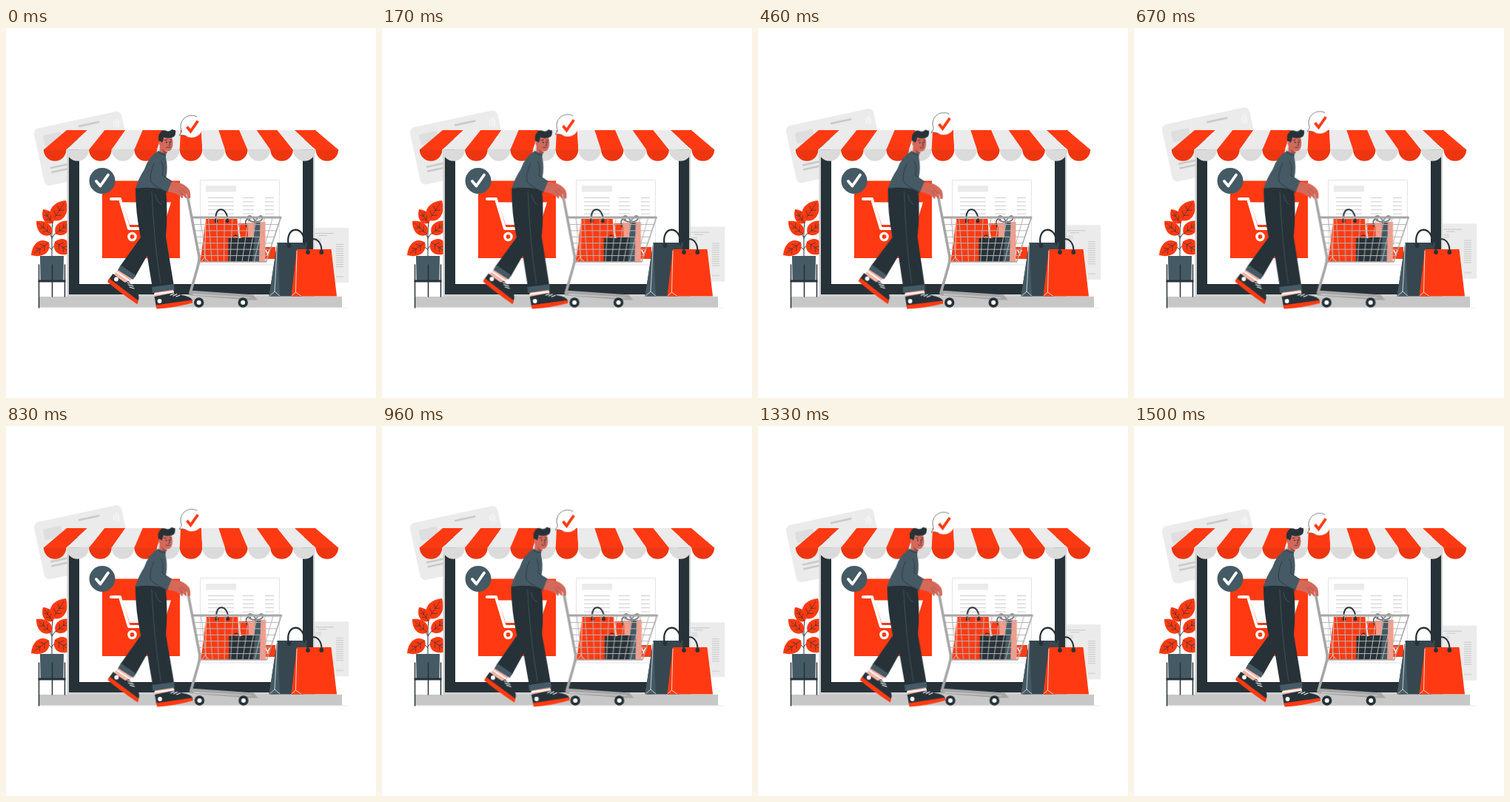
An HTML page for the animation above (1.54 s loop, 500 by 500 pixels).

```html
<!DOCTYPE html>
<html lang="en">
<head>
<meta charset="utf-8">
<title>Online shopping</title>
<style>
html, body { margin: 0; width: 100%; height: 100%; overflow: hidden; background: #fff; }
svg { display: block; width: 100vw; height: 100vh; }
.red { fill: #ff3a12; }
.dark { fill: #263238; }
.slate { fill: #455a64; }
.skin { fill: #d3695b; }
.light { fill: #ebebeb; }
.line { fill: none; stroke: #263238; stroke-linecap: round; stroke-linejoin: round; }
.white { fill: none; stroke: #fff; stroke-linecap: round; stroke-linejoin: round; }
.grey { fill: none; stroke: #a6a6a6; stroke-linecap: round; stroke-linejoin: round; }
.rule { fill: none; stroke: #c7c7c7; }
#man { transform-origin: 195px 258px; }
</style>
</head>
<body>
<svg viewBox="0 0 500 500">
  <g id="card">
    <g transform="translate(36.5 137) rotate(-12.2)">
      <rect class="light" width="121" height="79" rx="7"/>
      <rect x="11" y="11" width="25" height="15" rx="2" fill="#dedede"/>
      <path class="rule" stroke-width="2.5" d="M61 9H90M12 56H36M12 62H36"/>
      <path class="white" stroke-width="1" d="M108 13q2 3 0 6M110.5 11.5q3.5 4.5 0 9M113 10q4.5 6 0 12"/>
    </g>
  </g>

  <g id="doc">
    <rect class="light" x="405" y="270" width="58" height="74"/>
    <path id="docLines" class="rule" stroke-width="1.1" d="M418 277.5H443M422 280.5H434M418 285H426M418 288H426M446 336H456"/>
  </g>

  <path d="M45 378H462" stroke="#ddd" stroke-width=".6"/>
  <rect x="45" y="363" width="409" height="14.5" fill="#c7c7c7"/>

  <g id="plant">
    <path class="line" stroke-width="1" d="M62 308V278Q62 262 65 256M62 284Q64 279 70 275M62 298Q66 292 70 291M62 300Q58 294 52 295M62 283Q58 276 53 273"/>
    <g id="leaves"></g>
    <path class="slate" d="M46 308H78L77.5 341H46.500Z"/>
    <path class="line" stroke-width="1.500" stroke-linecap="butt" d="M44.500 320V378M79.500 320V363M62.500 320V363"/>
    <path class="dark" d="M43.500 340.500H80.500V343.500H43.500Z"/>
  </g>

  <g id="screen">
    <path d="M82.5 150H417V363H82.5Z" fill="#d0d0d0"/>
    <path class="dark" d="M85 150H415V360H85Z"/>
    <path d="M99 150H401V346H99Z" fill="#fff"/>
    <rect class="red" x="130" y="206.5" width="105" height="104.5"/>
    <path class="white" stroke-width="4" d="M142 231H154L166 271H214"/>
    <path d="M157 235.500H223L213.500 266H167Z" fill="#fff"/>
    <circle class="white" cx="170.5" cy="282" r="4.6" stroke-width="3.4"/>
    <path d="M262.5 320V205.5H369.5V320Z" fill="#fff" stroke="#dcdcdc" stroke-width=".8"/>
    <rect class="light" x="270" y="213" width="41" height="8.5"/>
    <path id="rows" class="rule" stroke-width=".9"/>
    <rect class="red" x="322" y="296" width="42" height="16"/>
    <text x="357" y="308" text-anchor="end" font-family="Lato, sans-serif" font-weight="900" font-size="10.5" fill="#fff">BUY</text>
  </g>

  <g id="awning"></g>

  <circle class="slate" cx="130" cy="206.5" r="17.5"/>
  <path class="white" stroke-width="3.9" stroke-linecap="butt" stroke-linejoin="miter" d="M122 207L127.500 213.500L138 198.500"/>

  <g id="bubble">
    <path d="M234 145Q237.500 141.500 237.200 139A15 15 0 1 1 243.500 146Q239 144 234 145Z" fill="#fff"/>
    <path class="line" stroke-width=".6" d="M243.500 146Q239 144 234 145Q237.500 141.500 237.200 139A15 15 0 0 1 258 119.800"/>
    <path d="M244.500 133.500L249.500 139.500L259.300 125.500" fill="none" stroke="#ff3a12" stroke-width="3.800"/>
  </g>

  <g id="bags">
    <path d="M366.500 290H407L401 362.500H355.500Z" fill="#37474f"/>
    <path class="slate" d="M366.500 290L355.500 362.500H370Z"/>
    <path class="white" stroke-width=".7" d="M366.500 292L363 356L356.500 362M363 356L370 362"/>
    <path class="line" stroke-width="2.300" d="M382 294C376 266 405 266 403 292"/>
    <circle class="dark" cx="382.500" cy="294" r="3"/>
    <path class="red" d="M393 299H439.500L447 362.500H385.500Z"/>
    <path class="white" stroke-width=".8" stroke-dasharray="3 .7" d="M393 301L391.500 357L386 362M391.500 357L398.500 362"/>
    <path class="line" stroke-width="2.100" d="M408 303C404 279 427 280 426.500 302"/>
    <circle class="dark" cx="408" cy="303" r="2.900"/>
    <circle class="dark" cx="426.300" cy="303" r="2.900"/>
  </g>

  <g id="cart">
    <path class="red" d="M270 258H312.500L316 316H262.500Z"/>
    <path class="white" stroke-width=".7" d="M270 260L268.500 310L263.500 316M268.500 310L274 316"/>
    <path class="line" stroke-width="2" d="M284 261C280 240 300 240 299.500 261"/>
    <circle class="dark" cx="284" cy="261" r="2.400"/>
    <circle class="dark" cx="299" cy="261" r="2.400"/>
    <path class="red" d="M314 264H338V285H317Z"/>
    <path d="M327 263H336V285H327ZM341 262H350.500V316H341Z" fill="#ff9a86"/>
    <path class="slate" d="M336 263H343.500L342 316H333Z"/>
    <path class="dark" d="M300.500 284H321V316H300.500ZM319 283H336L333 316H317Z"/>
    <path class="line" stroke-width="1.300" d="M305 286Q310 275 315 285M325 269Q321 256 330 259"/>
    <path class="line" stroke-width="1.800" style="stroke:#6f7a80" d="M337 262Q327 262 326 256Q330 250 337 261Q344 250 347 256Q346 262 337 262"/>
    <g id="wires" class="grey" style="stroke:#b4b4b4" stroke-width="1"></g>
    <path class="grey" stroke-width="1.500" d="M371 257L351.500 316H262"/>
    <path class="grey" stroke-width="3.200" d="M251.500 256H371"/>
    <path class="grey" stroke-width="3.600" d="M245.500 228L261 309Q261.500 315 259 323L249 358"/>
    <path d="M248 354.500L334 360.500L340 367.500H326L248 361.500Z" fill="#a6a6a6"/>
    <path d="M253 359L330 364V365L253 361Z" fill="#c7c7c7"/>
    <g id="wheels"></g>
  </g>

  <g id="man">
    <!-- rear leg -->
    <path d="M153 325L171 338L162 347L145 334Z" fill="#f3b3a5"/>
    <path class="white" stroke-width="2" d="M150 330L166 341"/>
    <path class="dark" d="M144.500 332Q153 339 161 344L165 342Q172 347 176 356Q180 360 179.500 366L177 371L138 341Z"/>
    <path class="red" d="M139.500 338.500L179 368.500L177.500 373.500Q153 357 137 343Z"/>
    <path class="white" stroke-width="1.100" d="M164 344L170.500 346M165 347L172 349M167 350L173 352"/>
    <circle cx="149" cy="339.500" r="2.900" fill="#fff"/>
    <path class="dark" d="M175 217L205 222Q206 270 195 300L174.500 336L154 322L182 283Q175 250 175 217Z"/>
    <path class="slate" d="M155 320.500L175.500 334.500L171.500 340L151 327Z"/>
    <!-- front leg -->
    <path d="M200 355L226 352L227 360L202 363Z" fill="#f3b3a5"/>
    <path class="white" stroke-width="2" d="M201 359.500L226 356.500"/>
    <path class="dark" d="M200.500 363L223 358.500Q231 357 238 361Q250 363 252 368L251 371L203 377Z"/>
    <path class="red" d="M202.500 374.500L252 367.500V371.500Q228 378 203.500 379.500Z"/>
    <path class="white" stroke-width="1.100" d="M222 361L227 359M226 362L231 359.500M230 363L235 361"/>
    <circle cx="207.500" cy="369" r="2.900" fill="#fff"/>
    <path class="dark" d="M175 216Q196 211 216 217Q219 250 216 282L227 349L198 352L187 285Q176 248 175 216Z"/>
    <path class="line" style="stroke:#455a64" stroke-width=".8" d="M197 221Q200 290 209 345M202 225Q204 236 210 238"/>
    <path class="slate" d="M197 350L227 346L227.500 353.500L198 358Z"/>
    <!-- head -->
    <path class="skin" d="M208 157L207.500 168Q212 173 216 169L217 160Z"/>
    <path d="M211 162Q213 168 218 167L217 170Q211 169 211 162Z" fill="#9e4539"/>
    <path class="skin" d="M209 148Q217 144 224 147Q227 157 224 163Q221 168 216 166Q211 165 209.500 160Q205.500 158 207 153Z"/>
    <path class="dark" d="M206.500 153Q205 145 208 142Q211 136 218 139.500Q221 140 223 138Q225 136 226.500 138Q230 137 229 142Q229 147 224 148Q217 149.500 213 147.500Q213 152 210.500 155Q209 152 206.500 153Z"/>
    <circle class="dark" cx="217" cy="154.500" r=".9"/>
    <circle class="dark" cx="222.500" cy="154" r=".9"/>
    <path class="line" stroke-width=".8" d="M214.500 151.800L217.500 151M221.500 151L224 151.500M220.500 154L222 158L220 158.500M217 161.200Q219.500 162.500 222 160.700"/>
    <!-- body -->
    <path class="slate" d="M206 166Q211 169 216 169.500V175Q219 188 216.500 201L212 218Q193 214 175 217Q179 203 187 191Q193 173 206 166Z"/>
    <path class="skin" d="M219 208L231 208.500Q243 211 248 219Q250 226 249 230L246 230Q245 225 243 223Q245 228 243.500 230.500L239 226Q240 230 237.500 230Q233 223 217 221Z"/>
    <path class="line" stroke-width=".6" style="stroke:#9e4539" d="M237 217L243 223M234 219L239 226"/>
    <path class="slate" d="M203 178Q212 172 215 183L212 199L224 207L218 222L197 212Q193 208 196 199Z"/>
    <path class="line" stroke-width=".7" d="M210 180Q214 187 211.500 199L224 207M200 183Q193 199 196 208Q198 212 218 222M206 168Q211 172 216 171.500"/>
  </g>
</svg>
<script>
const PERIOD = 1540;
const $ = id => document.getElementById(id);
const add = (id, html) => $(id).insertAdjacentHTML('beforeend', html);
const range = n => [...Array(n).keys()];

// Awning: 13 slanted stripes with scallops, the red ones wider at the top
const redW = 28, greyW = (336 - 7 * redW) / 6, lowW = 398.4 / 13;
range(13).forEach(i => {
  const red = i % 2 === 0, w = red ? redW : greyW;
  const a = 82 + Math.ceil(i / 2) * redW + Math.floor(i / 2) * greyW, b = 50.8 + i * lowW;
  add('awning',
    `<path d="M${a} 138h${w}L${b + lowW} 164.5H${b}Z" fill="${red ? '#ff3a12' : '#ebebeb'}"/>` +
    `<path d="M${b} 164.3h${lowW}a${lowW / 2} 15.5 0 0 1 ${-lowW} 0" fill="${red ? '#ee3510' : '#dbdbdb'}"/>` +
    `<path d="M${b} 164.3h${lowW}" stroke="${red ? '#d92c08' : '#c7c7c7'}" stroke-width=".5"/>`);
});

// Plant leaves: base, tip, half width
[[63, 260, 81, 233, 10], [63, 264, 50, 245, 7], [61, 279, 41, 261, 8],
 [67, 278, 88, 261, 8], [58, 290, 34, 307, 9], [66, 289, 88, 304, 10]].forEach(([x, y, u, v, w]) => {
  const len = Math.hypot(u - x, v - y), turn = Math.atan2(v - y, u - x) * 180 / Math.PI;
  const at = f => len * f;
  add('leaves', `<g transform="translate(${x} ${y}) rotate(${turn})">
    <path class="red" d="M0 0C${at(.15)} ${-w * 1.4} ${at(.65)} ${-w * 1.4} ${len} 0C${at(.65)} ${w * 1.4} ${at(.15)} ${w * 1.4} 0 0"/>
    <path class="line" stroke-width=".6" d="M0 0H${at(.85)}M${at(.25)} 0l4 ${-w * .6}M${at(.25)} 0l4 ${w * .6}M${at(.5)} 0l4 ${-w * .5}M${at(.5)} 0l4 ${w * .5}"/></g>`);
});

// Ruled lines
$('rows').setAttribute('d', range(5).map(i => {
  const y = 229.5 + i * 5.4;
  return `M273 ${y}H308M320 ${y}H335M350 ${y}H362`;
}).join(''));
$('docLines').setAttribute('d', $('docLines').getAttribute('d') +
  range(11).map(i => `M446 ${292.5 + i * 3}H456`).join(''));

// Basket wires and wheels
range(6).forEach(i => {
  const f = (i + 1) / 7, y = 257 + f * 59;
  add('wires', `<path d="M${252 + f * 10} ${y}H${371 - f * 19.5}"/>`);
});
range(10).forEach(i => {
  const f = (i + 1) / 11;
  add('wires', `<path d="M${252 + f * 119} 257L${262 + f * 89.5} 316"/>`);
});
[260.7, 320.2].forEach(x => add('wheels',
  `<circle class="dark" cx="${x}" cy="371" r="6.7"/><circle cx="${x}" cy="371" r="3" fill="#fff"/>`));

// Motion
const play = (id, frames, easing) =>
  $(id).animate(frames.map(([offset, transform]) => ({ offset, transform, easing })),
    { duration: PERIOD, iterations: Infinity });

['card', 'doc', 'bubble'].forEach(id => play(id,
  [[0, 'translateY(0px)'], [.5, 'translateY(-6.2px)'], [1, 'translateY(0px)']], 'linear'));
play('man', [[0, 0], [.25, 1], [.75, -1], [1, 0]].map(([o, a]) => [o, `rotate(${a}deg)`]), 'ease-in-out');
play('cart', [0, -1, 2, -2, 2, -2, 2, -2, 2, -1, 0].map((x, i) => [i / 10, `translateX(${x}px)`]), 'ease');
</script>
</body>
</html>
```
